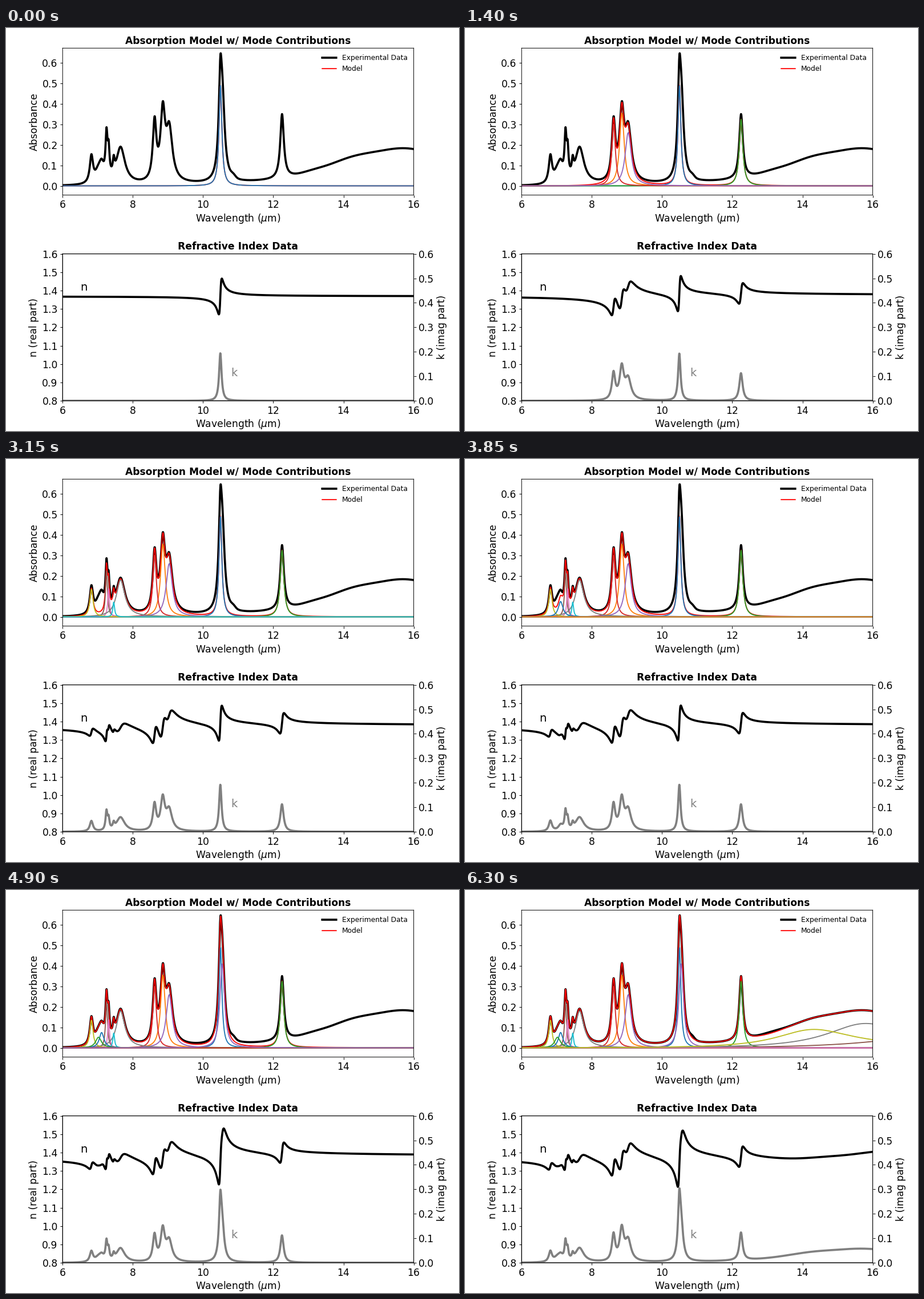
Animation, 794 px wide and 706 px high, one loop 6.65 s. Source, as a matplotlib script:

```python
import numpy as np
import matplotlib.pyplot as plt
from matplotlib.animation import FuncAnimation
from matplotlib.ticker import MultipleLocator

plt.rcParams["font.family"] = "DejaVu Sans"
plt.rcParams["path.snap"] = False

N_BASE = 1.3675
PATH = 1.26  # absorbance = 1 - exp(-PATH * Im(eps))

# Oscillators in order of appearance:
# centre (um), peak absorbance, half width (1/cm)
MODES = [
    (10.495, 0.49, 3.8), (8.855, 0.355, 9), (12.25, 0.325, 3.7),
    (8.62, 0.30, 7.5), (9.035, 0.26, 12), (7.25, 0.225, 6),
    (7.31, 0.138, 5.3), (7.65, 0.18, 24), (6.82, 0.135, 11.5),
    (7.455, 0.072, 5.3), (7.11, 0.075, 15.5), (6.95, 0.002, 10),
    (7.02, 0.052, 20), (7.2, 0.002, 15), (10.545, 0.41, 6.1),
    (17.86, 0.061, 70), (12.5, 0.001, 10), (15.75, 0.119, 54),
    (14.27, 0.09, 64),
]

wavelength = np.linspace(6, 16, 2001)
nu = 1e4 / wavelength


def oscillator(centre, peak, width):
    """Lorentz term of the permittivity that absorbs `peak` on resonance."""
    nu0 = 1e4 / centre
    strength = -np.log(1 - peak) / PATH
    return strength * 2 * width * nu0 / (nu0**2 - nu**2 - 2j * width * nu)


def absorbance(eps):
    return 1 - np.exp(-PATH * eps.imag)


def bump(centre, height, width):
    return height * np.exp(-((wavelength - centre) / width) ** 2)


terms = np.array([oscillator(*mode) for mode in MODES])
total_eps = N_BASE**2 + np.cumsum(terms, axis=0)
total_abs = absorbance(total_eps)
total_index = np.sqrt(total_eps)

# The measured spectrum has a faint shoulder and rise beyond the full model.
measured = total_abs[-1] + bump(10.86, 0.012, 0.09) + bump(13.1, 0.007, 0.45)

fig, (ax_abs, ax_n) = plt.subplots(2, 1, figsize=(8.9972, 8), dpi=88.25)
fig.subplots_adjust(left=0.125, right=0.9, top=0.95, bottom=0.075, hspace=0.4)
ax_k = ax_n.twinx()


def style(ax, ylabel, ylim):
    ax.set_xlim(6, 16)
    ax.set_ylim(*ylim)
    ax.set_ylabel(ylabel, fontsize=14)
    ax.tick_params(labelsize=14)
    ax.xaxis.set_major_locator(MultipleLocator(2))
    ax.yaxis.set_major_locator(MultipleLocator(0.1))


style(ax_abs, "Absorbance", (-0.045, 0.673))
style(ax_n, "n (real part)", (0.8, 1.6))
style(ax_k, "k (imag part)", (0, 0.6))
for ax, title in [(ax_abs, "Absorption Model w/ Mode Contributions"),
                  (ax_n, "Refractive Index Data")]:
    ax.set_title(title, fontsize=14, fontweight="bold")
    ax.set_xlabel(r"Wavelength ($\mu$m)", fontsize=14, labelpad=3)

ax_abs.plot(wavelength, measured, "k", lw=3, label="Experimental Data")
model_line, = ax_abs.plot(wavelength, total_abs[0], "r", lw=1.5, label="Model")
mode_lines = [ax_abs.plot(wavelength, absorbance(term), f"C{i % 10}", lw=1.5)[0]
              for i, term in enumerate(terms)]
ax_abs.legend(loc="upper right", frameon=False, fontsize=10)

n_line, = ax_n.plot(wavelength, total_index[0].real, "k", lw=3)
k_line, = ax_k.plot(wavelength, total_index[0].imag, "gray", lw=3)
ax_n.text(6.5, 1.4, "n", fontsize=16)
ax_k.text(10.8, 0.1, "k", fontsize=16, color="gray")


def update(frame):
    for i, line in enumerate(mode_lines):
        line.set_visible(i <= frame)
    model_line.set_ydata(total_abs[frame])
    n_line.set_ydata(total_index[frame].real)
    k_line.set_ydata(total_index[frame].imag)
    return [model_line, n_line, k_line, *mode_lines]


anim = FuncAnimation(fig, update, frames=len(MODES), interval=350,
                     repeat=True, repeat_delay=0)
plt.show()
```
